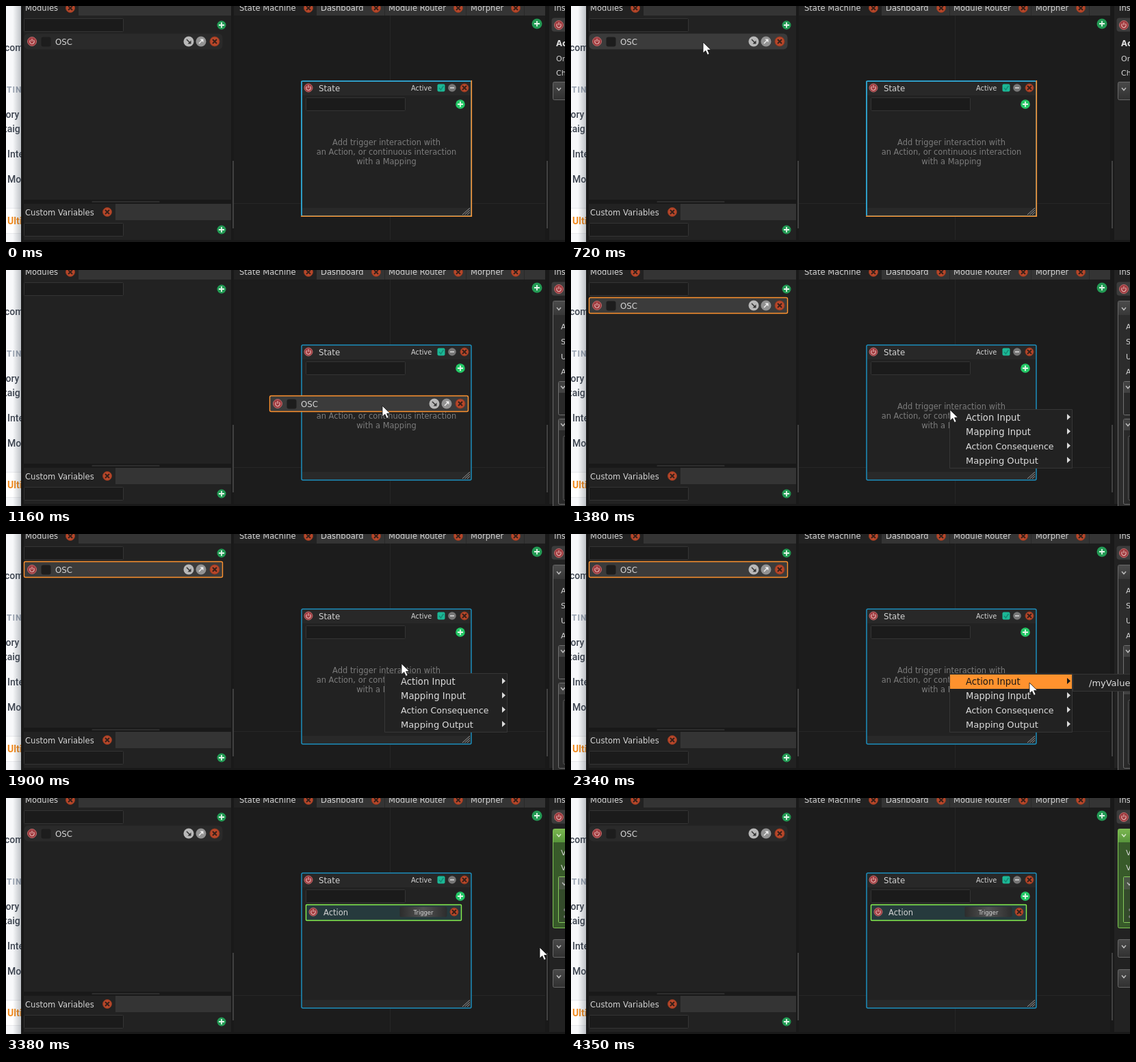
Animation of 817x346 px, one loop 4500 ms. Source, as an HTML page with a canvas:

```html
<!DOCTYPE html>
<html lang="en">
<head>
<meta charset="utf-8">
<title>Drag a module onto a state</title>
<style>
html, body { margin: 0; width: 100%; height: 100%; overflow: hidden; background: #181818; }
canvas { display: block; }
</style>
</head>
<body>
<canvas id="stage" width="817" height="346"></canvas>
<script>
const c = document.getElementById('stage').getContext('2d');
const LOOP = 4500, STEP = 73.8;
const SANS = '"DejaVu Sans", sans-serif', WEB = 'Roboto, sans-serif';
const ORANGE = '#ff922e', BLUE = '#1c8fbd';

// Pointer keys: step, x, y
const path = [
  [2, 342, 211], [4, 292, 164], [6, 232, 100], [8, 194, 57], [9, 189, 52],
  [11, 196, 54], [12, 270, 77], [13, 395, 115], [14, 495, 153], [15, 535, 181], [16, 550, 199], [17, 554, 205],
  [24, 554, 205], [26, 578, 190], [27, 601, 187], [28, 626, 194], [29, 646, 205], [30, 659, 213], [32, 670, 218],
  [35, 670, 218], [37, 700, 217], [39, 758, 218], [41, 780, 219],
  [49, 780, 219], [51, 777, 220], [53, 777, 220], [54, 776, 226], [56, 770, 270], [59, 774, 350]
];

function pointer(k) {
  const i = path.findIndex(p => p[0] >= k);
  if (i < 0) return path[path.length - 1].slice(1);
  if (i === 0) return path[0].slice(1);
  const a = path[i - 1], b = path[i], u = (k - a[0]) / (b[0] - a[0]);
  return [a[1] + (b[1] - a[1]) * u, a[2] + (b[2] - a[2]) * u];
}

function rect(x, y, w, h, fill) {
  c.fillStyle = fill;
  c.fillRect(x, y, w, h);
}

function box(x, y, w, h, r, fill, stroke, width = 1) {
  c.beginPath();
  c.roundRect(x + .5, y + .5, w - 1, h - 1, r);
  if (fill) { c.fillStyle = fill; c.fill(); }
  if (stroke) { c.strokeStyle = stroke; c.lineWidth = width; c.stroke(); }
}

function text(s, x, y, size = 11.55, color = '#d4d4d4', align = 'left', font = SANS, weight = 400) {
  c.font = `${weight} ${size}px ${font}`;
  c.textAlign = align;
  c.fillStyle = color;
  c.fillText(s, x, y);
}

function disc(x, y, r, fill, rim) {
  c.beginPath();
  c.arc(x, y, r, 0, 7);
  c.fillStyle = fill;
  c.fill();
  if (rim) { c.strokeStyle = rim; c.lineWidth = 1; c.stroke(); }
}

// Polylines given as flat coordinate lists
function lines(color, width, ...parts) {
  c.strokeStyle = color;
  c.lineWidth = width;
  c.beginPath();
  for (const p of parts)
    for (let i = 0; i < p.length; i += 2) c[i ? 'lineTo' : 'moveTo'](p[i], p[i + 1]);
  c.stroke();
}

function shape(fill, ...p) {
  c.beginPath();
  for (let i = 0; i < p.length; i += 2) c.lineTo(p[i], p[i + 1]);
  c.closePath();
  c.fillStyle = fill;
  c.fill();
}

function fade(x0, y0, x1, y1, ...colors) {
  const g = c.createLinearGradient(x0, y0, x1, y1);
  colors.forEach((col, i) => g.addColorStop(i / (colors.length - 1), col));
  return g;
}

function close(x, y, r = 6.5) {
  disc(x, y, r, '#b9472a', '#8d3820');
  lines('#35201a', 2, [x - 3, y - 3, x + 3, y + 3], [x + 3, y - 3, x - 3, y + 3]);
}

function plus(x, y, r = 6.5, fill = '#239a54') {
  disc(x, y, r, fill);
  lines('#e4f5ea', 1.8, [x - 4, y, x + 4, y], [x, y - 4, x, y + 4]);
}

function power(x, y, r = 6.5) {
  disc(x, y, r, '#a03b3f', '#b96a6b');
  c.strokeStyle = '#e3b2b0';
  c.lineWidth = 1.2;
  c.beginPath();
  c.arc(x, y + .3, 3.2, -.8, Math.PI + .8);
  c.stroke();
  lines('#e3b2b0', 1.2, [x, y - 4, x, y]);
}

function arrowDisc(x, y, fill, s) {
  disc(x, y, 7.5, fill);
  const col = s > 0 ? '#333' : '#eee';
  lines(col, 1.5, [x - 3, y - 3 * s, x + 2.5, y + 2.5 * s]);
  shape(col, x + 3.5, y + 3.5 * s, x + 3.5, y - 1.5 * s, x - 1.5, y + 3.5 * s);
}

function chevron(x, y, color = '#bbb') {
  lines(color, 1.5, [x - 3, y - 2, x, y + 1.5, x + 3, y - 2]);
}

function field(x, y) { box(x, y, 146, 20, 1, '#1b1b1b', '#343434'); }

function moduleRow(x, y, bg, rim) {
  box(x, y, 291, 24, rim ? 2 : 6, bg, rim, 1.4);
  power(x + 12, y + 12);
  box(x + 25, y + 5, 15, 15, 3, '#1d1d1d');
  text('OSC', x + 46, y + 17, 11.8);
  arrowDisc(x + 241, y + 12, '#b8b8b8', 1);
  arrowDisc(x + 259, y + 12, '#929292', -1);
  close(x + 279, y + 12, 7);
}

function webPage() {
  rect(0, 0, 22, 346, '#f7f8fa');
  rect(0, 297, 22, 36, '#fff');
  rect(0, 296, 22, 1, '#e8e9ec');
  rect(0, 333, 22, 1, '#e8e9ec');
  const web = (s, x, y, col = '#3d4450') => text(s, x, y, 14, col, 'left', WEB, 500);
  web('com', -2, 66);
  c.letterSpacing = '1px';
  text('TING', 1, 127, 12, '#98a2b1', 'left', WEB, 700);
  c.letterSpacing = '0px';
  web('tory', -5, 164);
  web('taig', -3, 185);
  web('Inte', 2, 222);
  web('Mo', 2, 259);
  text('Ulti', 2, 320, 14, '#f28a1c', 'left', WEB, 700);
  rect(10, 0, 12, 346, fade(10, 0, 22, 0, 'rgba(60,70,80,0)', 'rgba(60,70,80,.3)'));
}

function panels() {
  rect(22, 0, 795, 346, '#191919');
  // Modules and variables
  rect(26, 0, 303, 284, '#222');
  rect(106, 0, 223, 14, '#343434');
  text('Modules', 28, 7);
  close(94, 3);
  field(26, 18);
  plus(315, 28);
  box(125, 286, 100, 2, 1, '#444');
  rect(26, 290, 303, 53, '#222');
  rect(160, 290, 169, 24, '#343434');
  text('Custom Variables', 28, 307);
  close(148, 302);
  field(26, 318);
  plus(315, 328);
  // Graph
  rect(333, 0, 455, 343, '#1c1c1c');
  rect(561, 14, 1, 329, '#262626');
  rect(333, 289, 455, 1, '#262626');
  rect(333, 0, 121, 14, '#222');
  rect(454, 0, 334, 14, '#343434');
  for (const [s, x, end] of [['State Machine', 341, 442], ['Dashboard', 460, 541], ['Module Router', 559, 661], ['Morpher', 679, 745]]) {
    text(s, x, 7);
    close(end, 3);
  }
  for (const x of [553, 672, 757]) rect(x, 0, 1, 14, '#292929');
  plus(776, 26, 7.5);
  rect(331, 227, 2, 99, '#414141');
  rect(790, 227, 2, 99, '#414141');
  // Inspector
  rect(794, 0, 23, 343, '#222');
  text('Ins', 801, 7);
  box(797, 17, 40, 21, 4, '#3c3c3c');
  power(808, 28);
}

function section(y, h = 27) {
  box(799, y, 40, h, 2, fade(0, y, 0, y + h, '#4a4a4a', '#303030'), '#686868');
  chevron(808, y + 11);
}

function inspector(mode) {
  if (mode === 0) {
    text('Ac', 804, 59, 11.5, '#e0e0e0', 'left', SANS, 700);
    text('On', 804, 81, 11);
    text('Ch', 804, 102, 11);
    section(111);
  } else if (mode === 1) {
    box(799, 45, 40, 310, 2, '#2c2c2c', '#686868');
    rect(800, 46, 17, 20, fade(0, 46, 0, 66, '#4b4b4b', '#383838'));
    chevron(808, 57);
    ['A', 'S', 'U', 'A'].forEach((s, i) => text(s, 811, 87 + i * 22, 11));
    for (const [y, h] of [[163, 50], [218, 126]]) {
      box(807, y, 30, h, 2, '#292929', '#707070');
      rect(808, y + 1, 9, 16, '#414141');
      chevron(814, y + 9);
    }
    box(814, 243, 20, 95, 2, '#252525', '#555');
  } else {
    box(799, 45, 40, 146, 2, '#385a2a', '#7fc653');
    rect(800, 46, 17, 19, fade(0, 46, 0, 65, '#7ab650', '#57943b'));
    chevron(808, 55, '#d5e8c8');
    text('V', 811, 84, 11);
    text('V', 811, 106, 11);
    box(807, 115, 30, 68, 1, '#344b2b', '#86c95c');
    rect(808, 116, 9, 18, '#4a5545');
    chevron(816, 126);
    disc(817, 164, 2, '#777');
    disc(817, 174, 2, '#777');
    section(207);
    section(251);
  }
}

function stateBox(selected, hasAction) {
  box(431, 109, 250, 200, 2, '#222');
  rect(433, 111, 246, 20, '#282828');
  rect(433, 296, 246, 11, '#292929');
  box(431.5, 109.5, 249, 199, 2, null, BLUE, 1.5);
  if (selected) {
    lines(ORANGE, 1.6, [680.3, 109, 680.3, 308.2, 431, 308.2]);
    lines('#37b5e2', 1.3, [432, 307, 432, 110.3, 679, 110.3]);
  }
  power(442, 120, 6);
  text('State', 457, 125, 11.8);
  text('Active', 592, 124, 9.8);
  box(630, 114, 12, 12, 2, '#1cb896');
  lines('#148a74', 1.5, [633, 120, 635.5, 123, 639.5, 117]);
  disc(652, 120, 5.8, '#777');
  lines('#ddd', 1.5, [649, 120, 655, 120]);
  close(670, 120, 6);
  field(438, 134);
  plus(664, 144, 6.8, '#24c866');
  for (const d of [11, 7.5, 4]) lines('#999', 1, [678 - d, 306, 678, 306 - d * .9]);
  if (hasAction) {
    box(438, 156, 228, 24, 1, '#263a3d', '#86f24f', 1.4);
    power(449, 167, 6);
    text('Action', 464, 172, 11.5);
    box(575, 159, 70, 16, 2, fade(575, 0, 645, 0, '#2c2c2c', '#535353', '#2c2c2c'));
    text('Trigger', 610, 171, 8.4, '#d4d4d4', 'center');
    close(655, 167, 6);
  } else {
    ['Add trigger interaction with', 'an Action, or continuous interaction', 'with a Mapping']
      .forEach((s, i) => text(s, 556, 204 + i * 14, 11.45, '#7c7c7c', 'center'));
  }
}

function menu(hover, sub, subHover) {
  box(553, 204, 180, 87, 0, '#222', '#363636');
  [['Action Input', 13.2], ['Mapping Input', 13.2], ['Action Consequence', 12.6], ['Mapping Output', 13.1]].forEach(([s, size], i) => {
    const y = 221 + i * 21, on = hover && i === 0;
    if (on) rect(554, 206, 178, 21, ORANGE);
    text(s, 577, y, size, on ? '#171717' : '#dcdcdc');
    shape(on ? '#171717' : '#dcdcdc', 725, y - 10, 730, y - 5.5, 725, y - 1);
  });
  if (!sub) return;
  box(733, 205, 100, 26, 0, '#222', '#363636');
  if (subHover) rect(734, 208, 83, 21, ORANGE);
  text('/myValue', 757, 223, 13, subHover ? '#171717' : '#dcdcdc');
}

function cursor(x, y) {
  c.save();
  c.translate(Math.round(x), Math.round(y));
  c.beginPath();
  for (const [px, py] of [[0, 0], [0, 16], [3.8, 12.5], [6.5, 18.5], [9.2, 17.3], [6.6, 11.5], [11.5, 11.3]]) c.lineTo(px, py);
  c.closePath();
  c.fillStyle = '#fff';
  c.fill();
  c.strokeStyle = '#111';
  c.lineWidth = .8;
  c.stroke();
  c.restore();
}

function draw(now) {
  const k = Math.floor((now % LOOP) / STEP + .42);
  const [x, y] = pointer(k);
  const picked = k >= 11, dragging = k >= 12 && k < 18, done = k >= 44;
  webPage();
  panels();
  inspector(done ? 2 : picked ? 1 : 0);
  stateBox(!picked, done);
  if (!dragging) {
    const hover = k >= 2 && k < 12 && y < 64;
    moduleRow(26, 40, picked && !done || hover ? '#3b3b3b' : '#2a2a2a', picked && !done ? ORANGE : null);
  } else {
    const [gx, gy] = pointer(k - .13);
    moduleRow(Math.round(gx - 163), Math.round(gy - 13), '#3b3b3b', ORANGE);
  }
  if (k >= 18 && !done) menu(k >= 30, k >= 32, x >= 733);
  if (k >= 2 && k < 59) cursor(x, y);
  requestAnimationFrame(() => draw(performance.now() - start));
}

const start = performance.now();
draw(0);
</script>
</body>
</html>
```
